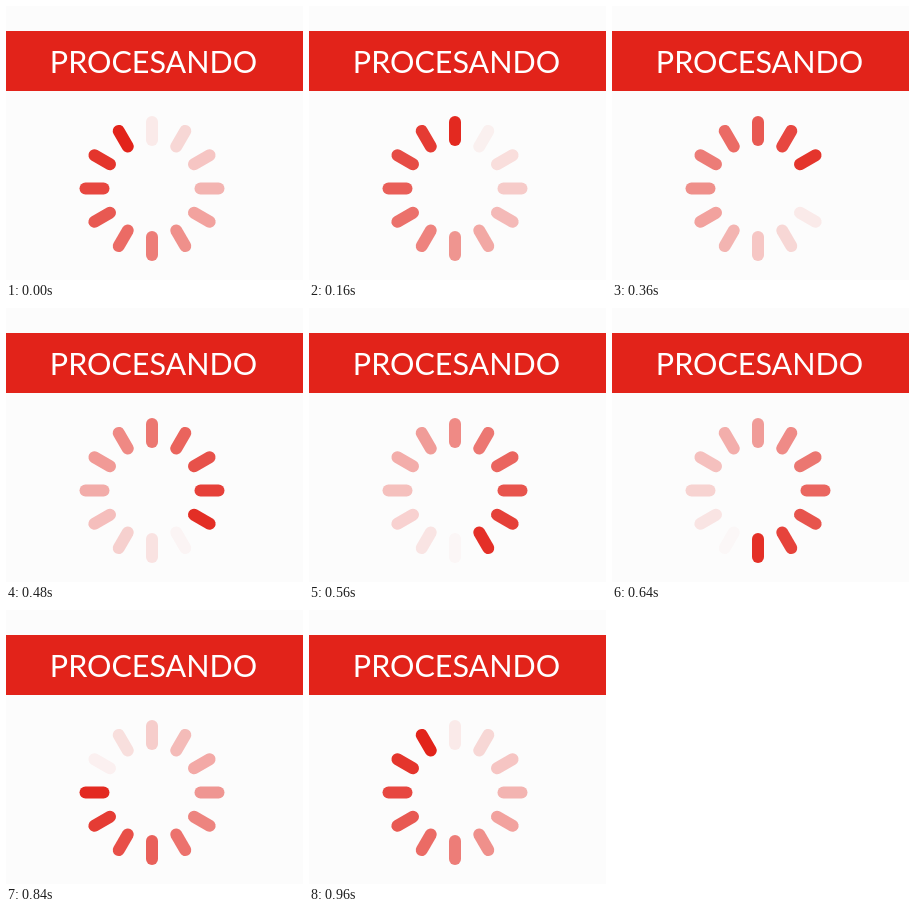
Animation, 297 px wide and 274 px high, one loop 1000 ms. Source, as an HTML page with a canvas:

```html
<!DOCTYPE html>
<html lang="es">
<head>
<meta charset="utf-8">
<title>Procesando</title>
<style>
  html, body { margin: 0; width: 100%; height: 100%; overflow: hidden; background: #fcfcfc; }
  canvas { display: block; }
</style>
</head>
<body>
<canvas id="stage" width="297" height="274"></canvas>
<script>
const ctx = document.getElementById('stage').getContext('2d');
const RED = '#e2231a';
const BARS = 12, LOOP = 1000, STEP = 40;
const CENTER = { x: 146, y: 182.5 };
const BAR = { width: 12, length: 30, outer: 72.5 };

function drawBanner() {
  ctx.fillStyle = RED;
  ctx.fillRect(0, 25, 297, 60);
  ctx.fillStyle = '#fff';
  ctx.font = '30.5px Lato, Carlito, sans-serif';
  ctx.textAlign = 'center';
  ctx.fillText('PROCESANDO', 147.5, 66.5);
}

function drawBar(i, alpha) {
  ctx.save();
  ctx.translate(CENTER.x, CENTER.y);
  ctx.rotate(i * 2 * Math.PI / BARS);
  ctx.globalAlpha = alpha;
  ctx.fillStyle = RED;
  ctx.beginPath();
  ctx.roundRect(-BAR.width / 2, -BAR.outer, BAR.width, BAR.length, BAR.width / 2);
  ctx.fill();
  ctx.restore();
}

// The turn rests briefly at the start of the loop, then runs evenly.
function turnAt(ms) {
  const t = Math.floor((ms % LOOP) / STEP) * STEP;
  return Math.min(1, Math.max(0, (t - 61) / 899));
}

function draw(ms) {
  const turn = turnAt(ms);
  ctx.fillStyle = '#fcfcfc';
  ctx.fillRect(0, 0, 297, 274);
  drawBanner();
  for (let i = 0; i < BARS; i++) {
    const age = (turn - (i + 1) / BARS + 2 + 1e-9) % 1;
    drawBar(i, 1 - age);
  }
}

let start;
function tick(now) {
  start ??= now;
  draw(now - start);
  requestAnimationFrame(tick);
}
draw(0);
requestAnimationFrame(tick);
</script>
</body>
</html>
```
